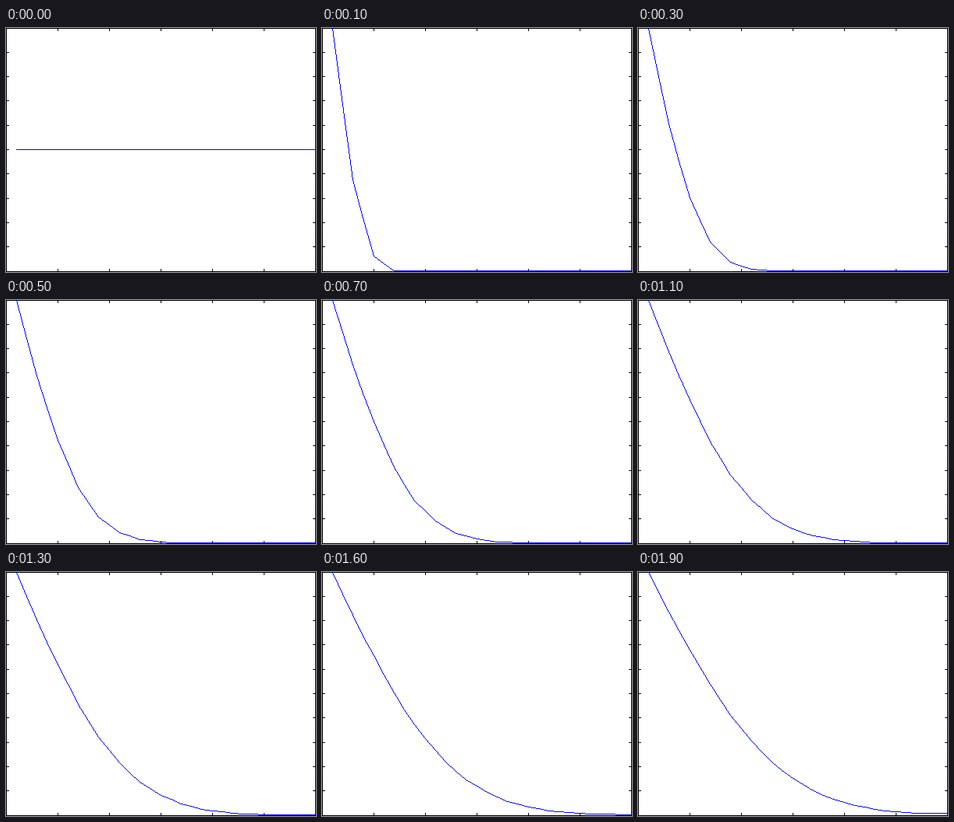
Write a matplotlib script that moves like this. It is 397 px wide and 314 px high and loops after 2000 ms.

```python
import numpy as np
import matplotlib.pyplot as plt
from matplotlib.animation import FuncAnimation
from matplotlib.collections import PolyCollection

W, H, DPI = 397, 314, 64
FRAMES, STEPS, NODES = 20, 5, 30
TICK = 4


def box(x, y, w, h):
    return [(x, y), (x + w, y), (x + w, y + h), (x, y + h)]


def diffuse():
    """Heat entering a cold rod: left end held at 1, right end insulated."""
    u = np.zeros(NODES)
    states = [u.copy()]
    u[0] = 1
    for _ in range(FRAMES - 1):
        for _ in range(STEPS):
            u[1:-1] = (u[:-2] + u[2:]) / 2
            u[-1] = u[-2]
        states.append(u.copy())
    return states


def trace(px, py):
    """Crisp one-pixel polyline, as one vertical run per column."""
    runs = {}
    for x0, y0, x1, y1 in zip(px, py, px[1:], py[1:]):
        n = max(abs(x1 - x0), abs(y1 - y0))
        for t in np.arange(n + 1) / n:
            x = int(np.floor(x0 + (x1 - x0) * t + 0.5))
            y = int(np.floor(y0 + (y1 - y0) * t + 0.5))
            lo, hi = runs.get(x, (y, y))
            runs[x] = min(lo, y), max(hi, y)
    return [box(x, lo, 1, hi - lo + 1) for x, (lo, hi) in runs.items()]


def axes_frame():
    parts = [box(0, 0, W, 1), box(0, H - 1, W, 1),
             box(0, 0, 1, H), box(W - 1, 0, 1, H)]
    for k in range(1, 6):
        x = 66 * k
        parts += [box(x, 0, 1, TICK), box(x, H - TICK, 1, TICK)]
    for k in range(1, 10):
        y = 313 * k // 10
        parts += [box(0, y, TICK, 1), box(W - TICK, y, TICK, 1)]
    return parts


states = diffuse()
node_x = [132 * i // 10 for i in range(1, NODES + 1)]

fig = plt.figure(figsize=(W / DPI, H / DPI), dpi=DPI, facecolor="white")
ax = fig.add_axes([0, 0, 1, 1])
ax.set_xlim(0, W)
ax.set_ylim(H, 0)
ax.axis("off")

style = dict(linewidths=0, edgecolors="none", antialiaseds=False)
ax.add_collection(PolyCollection(axes_frame(), facecolors="black", **style),
                  autolim=False)
curve = PolyCollection([], facecolors="blue", zorder=3, **style)
ax.add_collection(curve, autolim=False)


def draw(i):
    # the empty rod is shown on a -1..1 scale, all later states on 0..1
    level = states[i] if i else np.full(NODES, 0.5)
    node_y = np.floor(312.2 * (1 - level) + 0.7).astype(int)
    curve.set_verts(trace(node_x, node_y.tolist()))
    return (curve,)


anim = FuncAnimation(fig, draw, frames=FRAMES, interval=100, repeat=True)
plt.show()
```
